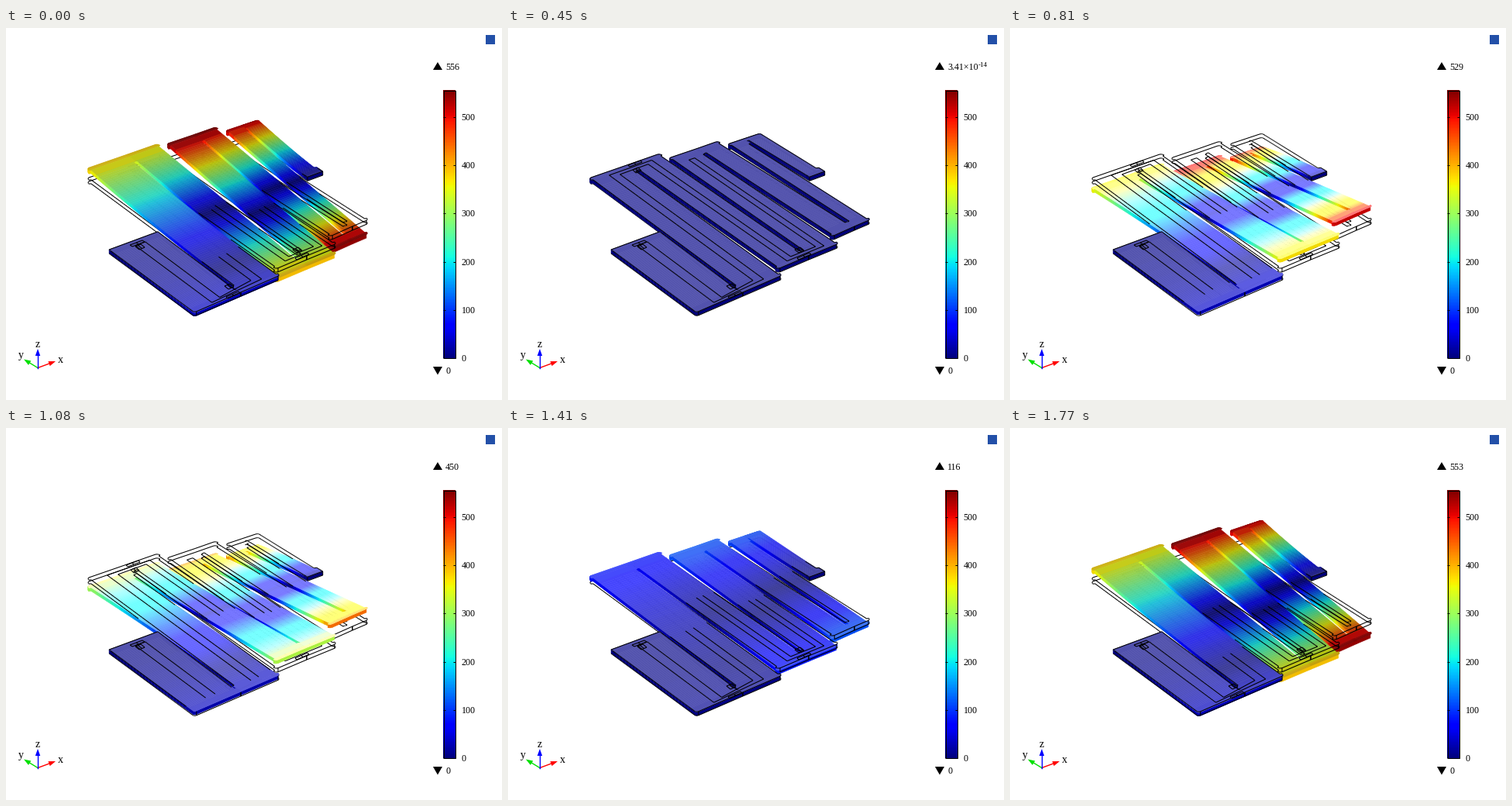
A matplotlib script for the animation above (1.8 s loop, 640 px wide and 480 px high).

```python
import numpy as np
import matplotlib.pyplot as plt
from matplotlib.animation import FuncAnimation
from matplotlib.collections import LineCollection, PolyCollection
from matplotlib.patches import Polygon, Rectangle

W, H, DPI = 640, 480, 100
FRAMES, STEP = 60, 30
PX = 72 / DPI
PEAK = 556.3
LIFT = 0.0335       # pixels per displacement unit
THICK = 4.5
SLOT = 0.055        # where the slots stop, measured from a joined end
ROUND = 0.018

# Corners of each arm: left back, left front, right back, right front
ARMS = np.array([
    [(133, 286), (243, 367), (198, 262), (303, 341)],
    [(104, 194), (303, 341), (156, 176), (354, 319)],
    [(156, 176), (348, 311), (196, 162), (388, 294)],
    [(207, 168), (388, 294), (244, 155.5), (427, 278)],
    [(244, 155.5), (418, 269), (271, 146), (447, 256)],
    [(283, 150), (447, 256), (304, 143), (468, 247)],
    [(304, 143), (387, 193), (325, 136), (406, 186)],
], float)
N = len(ARMS)
ENDS = [(0, -30), (385, -30), (385, -390), (556, -390),
        (556, -545), (525, -545), (525, 0)]
S = np.concatenate([np.linspace(0, ROUND, 7), [SLOT - 1e-4, SLOT + 1e-4],
                    np.linspace(0.07, 0.93, 72),
                    [1 - SLOT - 1e-4, 1 - SLOT + 1e-4],
                    np.linspace(1 - ROUND, 1, 7)])
MID = (S[1:] + S[:-1]) / 2
jet = plt.get_cmap("jet")


def point(k, w, s):
    """Resting top surface; w runs left to right, s back to front."""
    w, s = np.broadcast_arrays(np.asarray(w, float), np.asarray(s, float))
    w, s = w[..., None], s[..., None]
    lb, lf, rb, rf = ARMS[k]
    return (1 - s) * ((1 - w) * lb + w * rb) + s * ((1 - w) * lf + w * rf)


def mode(k, s):
    """Displacement along an arm at full swing."""
    s = np.asarray(s, float)
    back, front = ENDS[k]
    if k == 0:
        return front * s**2
    if k == N - 1:
        return back * (1 - s) ** 1.3
    bend = 300 if k == 1 else 0
    return back + (front - back) * s - bend * s * (1 - s)


def tilt(k, s):
    d = (mode(k, s - 1e-3) - mode(k, s + 1e-3)) / 2e-3
    return d * (2 if k == N - 1 else 1)


def from_joint(k, s, side):
    """Distance to the end joined with the neighbour on that side."""
    at_front = (k % 2 == 0) == (side == "right")
    return 1 - s if at_front else s


def is_outer(k, side):
    return (k, side) in ((0, "left"), (N - 1, "right"))


def joined(k, s, side):
    return (from_joint(k, s, side) < SLOT) & (not is_outer(k, side))


def inset(k, s, side):
    """Pixels cut off an edge by the slots and the rounded corners."""
    gap = np.where(joined(k, s, side), 0, 0 if is_outer(k, side) else 2.2)
    other = "right" if side == "left" else "left"
    if not is_outer(k, other):
        near = np.clip(1 - from_joint(k, s, other) / ROUND, 0, 1)
        gap = np.where(near > 0, 3 * (1 - np.sqrt(1 - near**2)), gap)
    if is_outer(k, side) and side == "right":
        gap = np.where(s > 0.9, -3, gap)
    return gap


def edge(k, s, side):
    width = ARMS[k][2, 0] - ARMS[k][0, 0]
    d = inset(k, s, side) / width
    return d if side == "left" else 1 - d


# Plate faces, far arms first
quads, quad_h, face_h, face_m, is_wall = [], [], [], [], []


def add_faces(pts, h, fh, fm, wall):
    quads.append(pts)
    quad_h.append(h)
    face_h.append(fh)
    face_m.append(fm)
    is_wall.append(np.full(len(fh), wall))


for k in reversed(range(N)):
    left, right = (point(k, edge(k, S, e), S) for e in ("left", "right"))
    h = mode(k, S)
    hm = mode(k, MID)
    tm = tilt(k, np.clip(MID, 0.002, 0.998))
    drop = np.array([0, THICK])
    hq = np.stack([h[:-1], h[1:], h[1:], h[:-1]], 1)
    front = np.array([[left[-1], right[-1], right[-1] + drop, left[-1] + drop]])
    add_faces(front, np.full((1, 4), h[-1]), h[-1:], np.zeros(1), True)
    add_faces(np.stack([left[:-1], left[1:], left[1:] + drop, left[:-1] + drop], 1),
              hq, hm, tm, True)
    add_faces(np.stack([left[:-1], left[1:], right[1:], right[:-1]], 1),
              hq, hm, tm, False)

quads, quad_h = np.concatenate(quads), np.concatenate(quad_h)
face_h, face_m = np.concatenate(face_h), np.concatenate(face_m)
is_wall = np.concatenate(is_wall)

# Resting wireframe, cut in short pieces that lie above or below the plates
segs, seg_h, seg_limit = [], [], []


def wire(pts, h, limit=20, keep=slice(None)):
    piece = np.stack([pts[:-1], pts[1:]], 1)[keep]
    hm = ((h[:-1] + h[1:]) / 2)[keep]
    segs.append(piece)
    seg_h.append(hm)
    seg_limit.append(np.full(len(hm), limit))


def straight(a, b, h, limit=20):
    wire(np.array([a, b], float), np.array([h, h], float), limit)


def along(k, w, s0, s1):
    s = np.linspace(s0, s1, 50)
    wire(point(k, w, s), mode(k, s))


def contact(a, b, gap, h):
    """Two parallel strokes from a to b, tied at the ends and the middle."""
    a, b, gap = (np.array(p, float) for p in (a, b, gap))
    straight(a, b, h)
    straight(a + gap, b + gap, h)
    for p in (a, (a + b) / 2, b):
        straight(p, p + gap, h)


down = np.array([0, 5.0])
for k in range(N):
    h = mode(k, S)
    for side in ("left", "right"):
        pts = point(k, edge(k, S, side), S)
        keep = ~(joined(k, S[1:], side) & joined(k, S[:-1], side))
        wire(pts, h, 20, keep)
        near = 60 if (k == 0 and side == "left") else -150
        wire(pts + down, h, near, keep)
    for end in (0.0, 1.0):
        e = np.array(end)
        a = point(k, edge(k, e, "left"), e)
        b = point(k, edge(k, e, "right"), e)
        he = mode(k, end)
        straight(a, b, he)
        straight(a + down, b + down, he, 60 if end else -150)
        if end:
            straight(a, a + down, he, 60)
            straight(b, b + down, he, 60)

# Two nested serpentine lines over the first four arms
LO, HI, OUT, INN = 0.42, 0.62, 0.024, 0.042
for k in range(4):
    for w in (LO, HI):
        back_out = (w == LO) if k % 2 else (w == HI)
        s0 = OUT if back_out else INN
        if k in (0, 3):
            s0 = 0.06
        along(k, w, s0, 1 - (INN if back_out else OUT))
for k in range(3):
    for wa, wb, d in ((LO, HI, OUT), (HI, LO, INN)):
        s = d if k % 2 else 1 - d
        straight(point(k, wa, s), point(k + 1, wb, s), mode(k, s))
for k in (0, 3):
    straight(point(k, LO, 0.06), point(k, HI, 0.06), mode(k, 0.06))

# Contact marks at the strip turns and slot ends
contact((155, 177), (171, 171), (2, 2), 385)
contact((284, 347), (300, 340), (2, 2), -30)
contact((373, 297), (389, 290), (2, 2), -390)
contact((160, 280), (176, 274), (3, 2), 0)
contact((167, 282), (174, 279), (5, 4), 0)
contact((161, 183), (168, 180), (4, 4), 370)
contact((282, 333), (289, 330), (5, 4), -25)
contact((370, 286), (377, 283), (5, 4), -350)

segs, seg_h = np.concatenate(segs), np.concatenate(seg_h)
seg_limit = np.concatenate(seg_limit)


def shade(c):
    rgb = jet(np.abs(face_h * c) / PEAK)[:, :3]
    m = face_m * c
    gloss = 0.47 * np.exp(-np.abs((m + 1100) / 1513) ** 3)
    diffuse = 0.72 + np.clip(-m, 0, 1000) * 0.00022
    lit = rgb * diffuse[:, None] + gloss[:, None]
    return np.clip(np.where(is_wall[:, None], rgb * 0.95, lit), 0, 1)


fig = plt.figure(figsize=(W / DPI, H / DPI), dpi=DPI, facecolor="white")
ax = fig.add_axes([0, 0, 1, 1])
ax.axis("off")

# Colour legend
TOP, BOTTOM, X0, X1 = 80, 426, 564, 580
ax.imshow(np.linspace(1, 0, 256)[:, None], cmap="jet", aspect="auto",
          extent=(X0, X1, BOTTOM, TOP), interpolation="bilinear")
ax.add_patch(Rectangle((X0 + 0.5, TOP + 0.5), X1 - X0 - 1, BOTTOM - TOP - 1,
                       fill=False, ec="black", lw=PX))
ax.set_xlim(0, W)
ax.set_ylim(H, 0)


def label(x, y, s, size=12, **kw):
    return ax.text(x, y + size / 3, s, fontsize=size * PX,
                   family="Liberation Serif", va="baseline", **kw)


for v in range(0, 501, 100):
    y = BOTTOM - v * (BOTTOM - TOP) / PEAK
    for x in (X0, X1 - 3):
        ax.plot([x, x + 3], [y, y], color="black", lw=PX,
                solid_capstyle="butt")
    label(587.5, y, str(v))
ax.add_patch(Polygon([(551, 54), (563, 54), (557, 44)], fc="black", lw=0))
ax.add_patch(Polygon([(551, 437), (563, 437), (557, 447.5)], fc="black", lw=0))
label(567, 442.5, "0")
top_text = label(567, 50.5, "")
power_text = label(607, 46.5, "", 9)

# Axis triad
for tip, name, at, color in (((64, 430), "x", (70, 427), "red"),
                             ((23, 427.5), "y", (19, 421), "#00e000"),
                             ((41, 414), "z", (41, 407), "blue")):
    o, t = np.array([41, 438.5]), np.array(tip)
    d = (t - o) / np.hypot(*(t - o))
    n = np.array([-d[1], d[0]])
    ax.plot(*zip(o, t - 5 * d), color=color, lw=1.4 * PX)
    ax.add_patch(Polygon([t, t - 9 * d + 3.2 * n, t - 9 * d - 3.2 * n],
                         fc=color, lw=0))
    label(*at, name, 14, ha="center")

ax.add_patch(Rectangle((619, 9), 12, 12, fc="#2350a8", lw=0))

line_style = dict(colors="black", linewidths=1.05 * PX)
below = LineCollection([], zorder=3, **line_style)
plates = PolyCollection([], zorder=4, linewidths=0.5 * PX, edgecolors="face")
above = LineCollection([], zorder=5, **line_style)
for item in (below, plates, above):
    item.set_snap(False)
    ax.add_collection(item, autolim=False)


def update(i):
    c = np.cos(2 * np.pi * (i / FRAMES))
    verts = quads.copy()
    verts[..., 1] -= LIFT * quad_h * c
    plates.set_verts(verts)
    plates.set_facecolor(shade(c))
    over = seg_h * c <= seg_limit
    above.set_segments(segs[over])
    below.set_segments(segs[~over])
    value = PEAK * abs(c)
    if value < 1e-6:
        digits, power = f"{value:.2e}".split("e")
        top_text.set_text(f"{digits}×10")
        power_text.set_text(str(int(power)))
    else:
        top_text.set_text(f"{value:.3g}")
        power_text.set_text("")
    return below, plates, above, top_text, power_text


anim = FuncAnimation(fig, update, frames=FRAMES, interval=STEP,
                     repeat=True, repeat_delay=0, blit=False)
plt.show()
```
